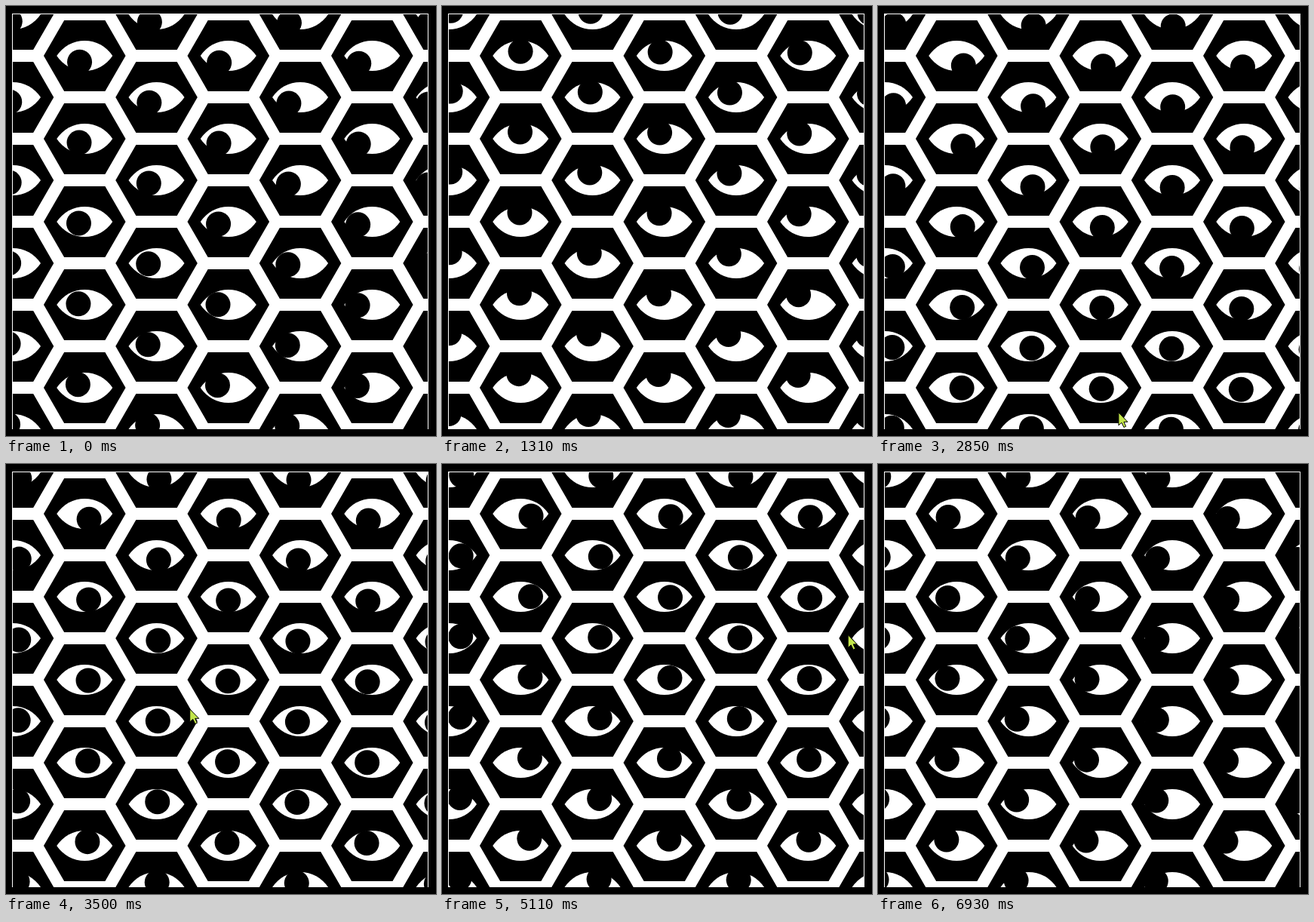
These frames come from a looping animation (570 by 570 pixels, 7 s). An HTML page:

```html
<!DOCTYPE html>
<html lang="en">
<head>
<meta charset="utf-8">
<title>Watching eyes</title>
<style>
  html, body { margin: 0; width: 100%; height: 100%; overflow: hidden; background: #000; }
  svg { display: block; width: 100vw; height: 100vh; }
</style>
</head>
<body>
<svg viewBox="0 0 570 570">
  <defs>
    <clipPath id="window"><rect x="9" y="11" width="550" height="550"/></clipPath>
  </defs>
  <rect x="8" y="10" width="552" height="551" fill="#fff"/>
  <g clip-path="url(#window)">
    <g id="cells"></g>
    <g id="pupils"></g>
  </g>
  <path id="cursor" d="M0 0V17L4 13.4L7 19.6L9.7 18.4L7 12.4H12Z"
        fill="#c3e64a" stroke="#000" stroke-linejoin="round"/>
</svg>
<script>
const LOOP = 7000, HOLD = 460, STEP = 70.3;
const PITCH = 110, COLUMN = PITCH * Math.sqrt(3) / 2;
const INRADIUS = 47, RADIUS = INRADIUS * 2 / Math.sqrt(3);
const SHRINK = 0.0285, TWIST = 0.005;     // pupil lattice relative to the eye lattice
const FOCUS = { x: 17, y: 20 };           // fixed point, measured from the cursor tip
const CENTER = { x: 284, y: 286 };

// The cursor circles the center clockwise: step, angle in degrees, distance
const spiral = [
  [0, 180, 474], [12, 249, 471], [24, 383, 496], [43, 496, 56],
  [54, 620, 175], [67, 716, 264], [78, 851, 233], [92, 914, 624]
];

function make(parent, name, attributes) {
  const node = document.createElementNS("http://www.w3.org/2000/svg", name);
  for (const key in attributes) node.setAttribute(key, attributes[key]);
  return parent.appendChild(node);
}

const cellLayer = document.getElementById("cells");
const pupilLayer = document.getElementById("pupils");
const cursor = document.getElementById("cursor");

const hexagon = Array.from({ length: 6 }, (_, i) =>
  [RADIUS * Math.cos(i * Math.PI / 3), RADIUS * Math.sin(i * Math.PI / 3)]).join(" ");

const eyes = [];
for (let col = 0; col < 7; col++) {
  for (let row = 0; row < 6; row++) {
    const x = 9 + col * COLUMN;
    const y = 11 + row * PITCH + (col % 2) * PITCH / 2;
    const cell = make(cellLayer, "g", { transform: `translate(${x} ${y})` });
    make(cell, "polygon", { points: hexagon });
    make(cell, "path", { d: "M-37 0A44.2 44.2 0 0 1 37 0A44.2 44.2 0 0 1 -37 0Z", fill: "#fff" });
    eyes.push({ x, y, pupil: make(pupilLayer, "circle", { r: 16.5 }) });
  }
}

function slope(i, axis) {
  const before = spiral[Math.max(0, i - 1)];
  const after = spiral[Math.min(spiral.length - 1, i + 1)];
  return (after[axis] - before[axis]) / (after[0] - before[0]);
}

// Smooth curve through the key points
function along(step, axis) {
  let i = 0;
  while (i < spiral.length - 2 && step >= spiral[i + 1][0]) i++;
  const from = spiral[i], to = spiral[i + 1], span = to[0] - from[0];
  const u = Math.min(1, (step - from[0]) / span), v = 1 - u;
  return from[axis] * v * v * (1 + 2 * u) + to[axis] * u * u * (3 - 2 * u)
    + span * u * v * (slope(i, axis) * v - slope(i + 1, axis) * u);
}

function draw(time) {
  const step = Math.max(0, Math.floor((time - HOLD) / STEP));
  const angle = along(step, 1) * Math.PI / 180, distance = along(step, 2);
  const x = CENTER.x + distance * Math.cos(angle);
  const y = CENTER.y + distance * Math.sin(angle);
  for (const eye of eyes) {
    const dx = eye.x - x - FOCUS.x, dy = eye.y - y - FOCUS.y;
    eye.pupil.setAttribute("cx", eye.x - SHRINK * dx - TWIST * dy);
    eye.pupil.setAttribute("cy", eye.y + TWIST * dx - SHRINK * dy);
  }
  cursor.setAttribute("transform", `translate(${x} ${y})`);
}

const start = performance.now();
function tick() {
  draw((performance.now() - start) % LOOP);
  requestAnimationFrame(tick);
}
tick();
</script>
</body>
</html>
```
